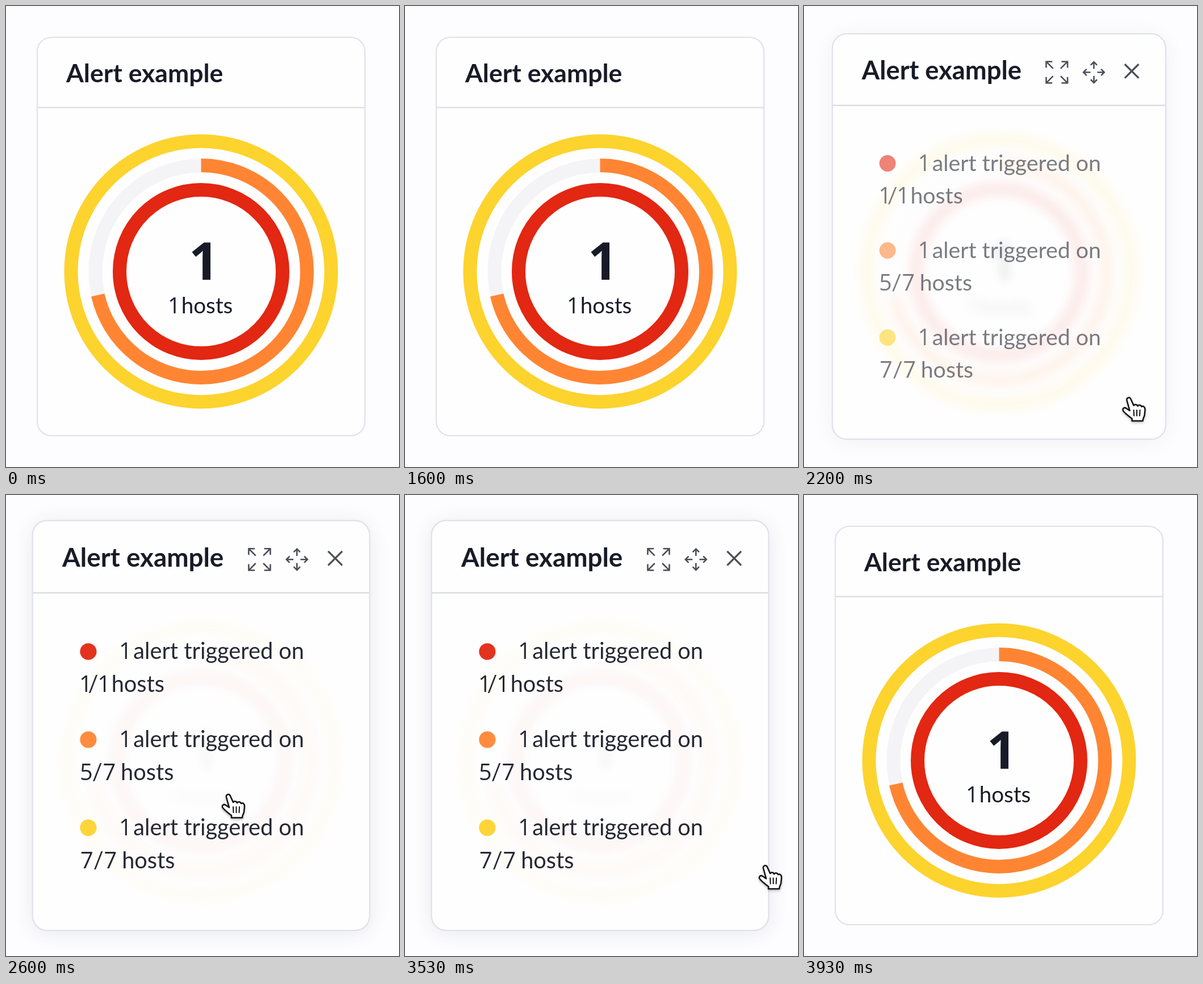
These frames come from a looping animation (692 px wide and 810 px high, 3990 ms). An HTML page:

```html
<!DOCTYPE html>
<html lang="en">
<head>
<meta charset="utf-8">
<title>Alert card</title>
<style>
  html, body { margin: 0; width: 100%; height: 100%; overflow: hidden; background: #fdfdff; }
  svg { display: block; width: 692px; height: 810px; }
  .ring { fill: none; stroke-width: 24; }
  .icons { fill: none; stroke: #4b4d58; stroke-width: 2.5; }
  .hand { fill: #fff; stroke: #111; stroke-width: 2.5; stroke-linejoin: round; stroke-linecap: round;
    filter: drop-shadow(0 2px 2px rgba(0, 0, 0, .28)); }
</style>
</head>
<body>
<svg viewBox="0 0 692 810">
  <g id="card">
    <rect id="shadow" x="55" y="59" width="577" height="700" rx="26" fill="#3a3a66" style="filter: blur(17px)"/>
    <rect x="55" y="55" width="577" height="700" rx="25" fill="#fefefe" stroke="#e0e1ea" stroke-width="2.2"/>
    <path d="M56 178.500H631" stroke="#d9dae2" stroke-width="2.2"/>
    <g id="title"></g>
    <g id="donut"><g id="rings" transform="translate(343.500 466.500) rotate(-90)"></g></g>
    <g id="list"></g>
    <g id="icons" class="icons">
      <g id="expand" transform="translate(443.500 121.500)"></g>
      <g id="move" transform="translate(507.500 121.500)"></g>
      <path d="M561 107.500l24 24m0-24l-24 24" stroke-width="3.2"/>
    </g>
  </g>
  <g id="hand" class="hand">
    <path d="M8 6C7 1 13 -1 15 4L20 15C22 12 26 13 27 16C29 13 33 14 34 17C37 15 40 18 40 22L39 32C38 36 36 38 36 42H17V38C12 34 6 30 2 25C-1 21 3 17 7 20L13 24Z"/>
    <path d="M20 23l.5 10m5-10v10m5.500-10l-.5 10" stroke-width="2"/>
  </g>
</svg>
<script>
const NS = 'http://www.w3.org/2000/svg';
const $ = id => document.getElementById(id);
const pen = document.createElement('canvas').getContext('2d');
const LATO = "Lato, 'Open Sans', sans-serif";
const DIGITS = "'Open Sans', 'Noto Sans', sans-serif";
const [RED, ORANGE, YELLOW] = ['#e22712', '#ff8533', '#fdd32e'];

function add(parent, tag, attrs) {
  const el = document.createElementNS(NS, tag);
  for (const key in attrs) el.setAttribute(key, attrs[key]);
  return parent.appendChild(el);
}

// Places text with its visible left edge at x and returns the right edge.
function label(parent, str, x, y, size, weight = 400, family = LATO) {
  pen.font = `${weight} ${size}px ${family}`;
  const ink = pen.measureText(str);
  const left = x + ink.actualBoundingBoxLeft;
  add(parent, 'text', {
    x: left, y, fill: '#181b27', 'font-size': size, 'font-weight': weight, 'font-family': family
  }).textContent = str;
  return left + ink.actualBoundingBoxRight;
}

// Sets digits tightly, one by one, followed by the words.
function line(parent, str, x, y) {
  for (const part of str.match(/[\d/]| |[a-z][a-z ]*/g)) {
    if (part === ' ') x += 9.5;
    else x = label(parent, part, x, y, 38.6, 400, /\d/.test(part) ? DIGITS : LATO) + 2.2;
  }
}

function ring(r, color, share = 7) {
  add($('rings'), 'circle', {
    class: 'ring', r, stroke: color, pathLength: 7,
    'stroke-dasharray': share < 7 ? `${share} 7` : 'none'
  });
}

label($('title'), 'Alert example', 105, 134, 44.5, 700);
ring(229, YELLOW);
ring(186, '#f4f4f6');
ring(186.5, ORANGE, 5);
ring(143.5, RED);
label($('donut'), '1', 327, 480.5, 92, 700, DIGITS);
line($('donut'), '1 hosts', 288, 540);

[[RED, '1/1'], [ORANGE, '5/7'], [YELLOW, '7/7']].forEach(([color, share], i) => {
  const y = 291.5 + i * 150.4;
  add($('list'), 'circle', { cx: 150.5, cy: y - 12.8, r: 14.2, fill: color });
  line($('list'), '1 alert triggered on', 206, y);
  line($('list'), `${share} hosts`, 138, y + 56.6);
});

for (let a = 0; a < 360; a += 90) {
  const transform = `rotate(${a})`;
  add($('expand'), 'path', { transform, d: 'M6.500 -6.500L18 -18M8 -18.500H18.500V-8' });
  add($('move'), 'path', { transform, d: 'M0 -6V-18M-5.500 -12.500L0 -18L5.500 -12.500' });
}

const ENTER = 29, LEAVE = 53;
const span = (tick, from, to) => Math.min(1, Math.max(0, (tick - from) / (to - from)));
const smooth = k => k * k * (3 - 2 * k);

function hover(tick) {
  if (tick > LEAVE) {
    const rest = (1 - span(tick, LEAVE, LEAVE + 5)) ** 2.5;
    return { lift: rest, donut: 1 - .965 * rest, blur: 0, list: 0 };
  }
  const k = span(tick, ENTER, ENTER + 7);
  const lift = smooth(k);
  return {
    lift,
    donut: .035 + .965 * (1 - k) ** 3.5,
    blur: 9 * (1 - (1 - k) ** 5),
    list: .94 * lift
  };
}

// Pointer stops: tick, x, y
const STOPS = [[ENTER, 636, 733], [31, 594, 717], [39, 380, 525], [45, 420, 397], [48, 420, 397], [LEAVE, 623, 650]];

function pointer(tick) {
  const i = Math.max(1, STOPS.findIndex(stop => stop[0] >= tick));
  const [t0, x0, y0] = STOPS[i - 1], [t1, x1, y1] = STOPS[i];
  const k = smooth(span(tick, t0, t1));
  return `translate(${x0 + (x1 - x0) * k} ${y0 + (y1 - y0) * k})`;
}

const show = (el, on) => { el.style.visibility = on ? 'visible' : 'hidden'; };

function draw(ms) {
  // Fifteen ticks a second, at 0, 70 and 130 ms of every 200.
  const rest = ms % 200;
  const tick = 3 * Math.floor(ms / 200) + (rest >= 70) + (rest >= 130);
  const { lift, donut, blur, list } = hover(tick);
  $('card').setAttribute('transform',
    `translate(343.3 404.7) scale(${1 + .029 * lift}) translate(-343.3 -404.7)`);
  $('shadow').style.opacity = .1 * lift;
  $('donut').style.opacity = donut;
  $('donut').style.filter = blur ? `blur(${blur}px)` : 'none';
  $('list').style.opacity = list;
  show($('icons'), tick > ENTER && tick <= LEAVE);
  show($('hand'), tick >= ENTER && tick <= LEAVE);
  $('hand').setAttribute('transform', pointer(tick));
}

const start = performance.now();
function loop() {
  draw((performance.now() - start) % 3990);
  requestAnimationFrame(loop);
}
loop();
</script>
</body>
</html>
```
